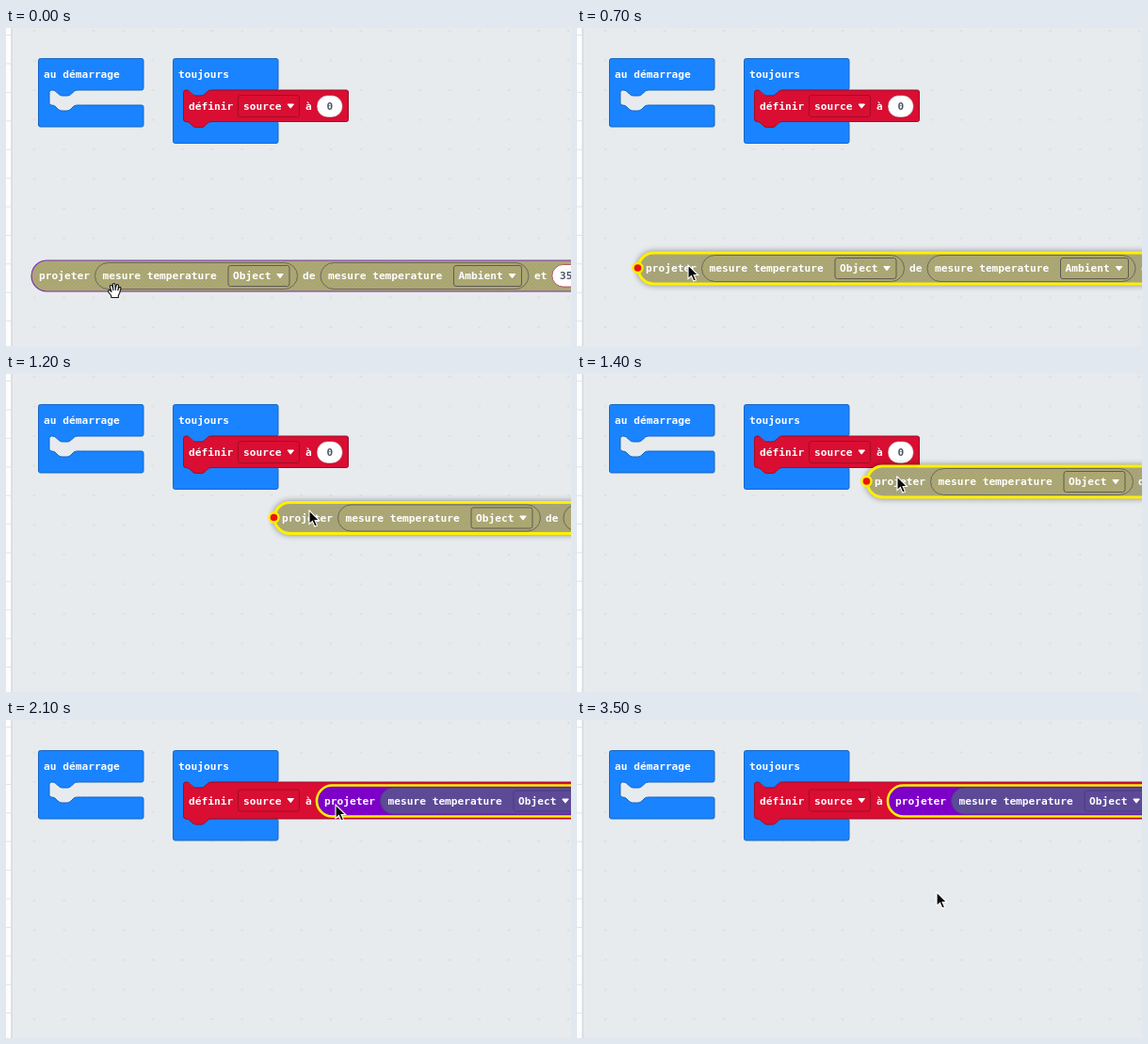
Animation of 600 by 338 pixels, one loop 3.6 s. Source, as an HTML page:

```html
<!DOCTYPE html>
<html lang="fr">
<head>
<meta charset="utf-8">
<title>Blocs</title>
<style>
  html, body { margin: 0; width: 100%; height: 100%; overflow: hidden; background: #e7ebee; }
  svg { display: block; width: 600px; height: 338px; }
  text { font: bold 11.2px "DejaVu Sans Mono", "Noto Sans Mono", monospace; fill: #fff; white-space: pre; }
  text.num { fill: #4f566b; }
  .event { fill: #1a83ff; stroke: #1767c4; }
  .set { fill: #d90e32; stroke: #a00d28; }
  .box { fill: none; stroke: #a50c26; }
  .tri { fill: #fff; stroke: #fff; stroke-width: 1; stroke-linejoin: round; }
  .input { fill: #fff; stroke: #a00d28; stroke-width: .6; }
  .glow { fill: none; stroke: #fdf000; stroke-width: 3; }
  .dot { fill: #ee1313; stroke: #fdee00; stroke-width: 2.4; }
  .link { stroke: #fdee00; stroke-width: 3; }

  .body { fill: url(#hatch); stroke: #7c2fae; stroke-width: 1.2; }
  .pill { fill: url(#hatch); stroke: #69675a; }
  .menu { fill: none; stroke: #5d5b52; }
  .picked .body { stroke: #fdf000; stroke-width: 3; }
  .dragged { filter: drop-shadow(0 0 3px rgba(0, 0, 0, .45)); }
  .dragged .body { fill-opacity: .85; }
  .joined .body { fill: #7d00c8; stroke-width: 2.6; }
  .joined .pill { fill: #5c4a97; stroke: #4d3c86; }
  .joined .menu { stroke: #4b3b82; }
</style>
</head>
<body>
<svg viewBox="0 0 600 338">
  <defs>
    <pattern id="hatch" width="4" height="4" patternUnits="userSpaceOnUse">
      <path d="M0 0h4v4h-4z" fill="#a6a37f"/>
      <path d="M0 0L4 4M4 0L0 4" stroke="#b3ac62" stroke-width=".8"/>
    </pattern>
    <pattern id="grid" x="30" y="2" width="31.5" height="31.5" patternUnits="userSpaceOnUse">
      <path d="M30 1h3M0 1h1.5M.5 0v2" stroke="#d9dde0" stroke-width="1"/>
    </pattern>
    <pattern id="ticks" y="37.5" width="5" height="30.4" patternUnits="userSpaceOnUse">
      <path d="M0 .5h5" stroke="#dfe2e4"/>
    </pattern>
  </defs>
  <path d="M0 0H600V338H0z" fill="#e7ebee"/>
  <path d="M0 0H600V338H0z" fill="url(#grid)"/>
  <path d="M0 0H5.5V338H0z" fill="#fdfdfd"/>
  <path d="M0 0H5V338H0z" fill="url(#ticks)"/>
  <path d="M6 0V338" stroke="#cdd1d4"/>
  <path id="start" class="event"/>
  <path id="forever" class="event"/>
  <text x="40" y="53">au démarrage</text>
  <text x="183" y="53">toujours</text>
  <path id="set" class="set"/>
  <g id="setLabel">
    <text x="194" y="87">définir</text>
    <rect class="box" x="246.500" y="71.500" width="65" height="23" rx="2.500"/>
    <text x="252" y="87">source</text>
    <path class="tri" d="M299 81h6.500l-3.250 4.200z"/>
    <text x="318" y="87">à</text>
  </g>
  <g id="zero">
    <rect class="input" x="330" y="71.500" width="27.500" height="23.500" rx="11.750"/>
    <text class="num" x="340.400" y="87">0</text>
  </g>
  <g id="hint">
    <rect class="glow" x="330" y="70.500" width="28" height="25" rx="12.500"/>
    <circle class="dot" cx="329" cy="83" r="5"/>
  </g>
  <g id="map"></g>
  <path id="link" class="link"/>
  <circle id="dot" class="dot" r="5"/>
  <path id="arrow" d="M0 0V14.600L3.400 11.500L5.800 17L8.400 15.900L6.100 10.500H10.600z"
        fill="#0a0a0a" stroke="#fff" stroke-width="1.100"/>
  <g id="hand" stroke="#151515" stroke-width="1.100" stroke-linejoin="round" fill="#fff">
    <path d="M-3 8.500L-3.600 6L-6.300 2.600Q-7 .6-5 .5L-3 2.300L-4.600-3.200Q-4.600-5.200-2.700-4.600L-1.200-1L-1.600-5.600
             Q-.4-7.300 .8-5.600L1.200-1L2.400-5.200Q3.900-6.200 4.500-4.500L4 0L5.200-2.400Q6.800-3.200 7-1.500L5.600 4L4.300 6.200V8.500z"/>
    <path d="M-1.200-1V1M1.200-1V1M4 0L3.700 1.200" fill="none"/>
  </g>
</svg>
<script>
const LOOP = 3600, STEP = 100, PICK = 400, LIFT = 700, NEAR = 1500, JOIN = 1900;

// time, x, y
const pointer = [[0, 115, 278], [100, 102, 275], [300, 72, 265], [400, 69, 264], [600, 69, 264],
  [700, 118, 252], [800, 190, 232], [900, 247, 210], [1000, 281, 187], [1200, 322, 145],
  [1400, 340, 109], [1600, 346, 95], [1900, 347, 93], [2100, 350, 90], [2400, 350, 91],
  [2700, 364, 130], [3000, 379, 172], [3200, 382, 183], [3600, 382, 183]];
const offset = [[0, 0, 0], [600, 0, 0], [700, 38, -8], [800, 98, -23], [900, 161, -40],
  [1000, 206, -63], [1200, 258, -110.5], [1400, 281, -149], [1600, 287, -167],
  [1899, 288, -168], [1900, 303, -177.5], [3600, 303, -177.5]];

const $ = id => document.getElementById(id);
const attr = (id, name, value) => $(id).setAttribute(name, value);
const show = (id, on) => attr(id, "visibility", on ? "visible" : "hidden");
const move = (id, x, y) => attr(id, "transform", `translate(${x} ${y})`);

const notchLeft = "h-4q-3 0-4.500 2l-2 2q-2 2-4 2h-6q-2 0-4-2l-2-2q-1.500-2-4.500-2";
const notchRight = "q3 0 4.500 2l2 2q2 2 4 2h6q2 0 4-2l2-2q1.500-2 4.500-2h4";

function hat(x, slotBottom) {
  const r = x + 112, end = slotBottom + 23;
  return `M${x + 2.5} 32.500H${r - 2}q2 0 2 2V64q0 2-2 2H${x + 46}${notchLeft}H${x + 14.5}q-2.500 0-2.500 2.500` +
    `V${slotBottom - 2.5}q0 2.500 2.500 2.500${notchRight}H${r - 2}q2 0 2 2V${end - 2}q0 2-2 2H${x + 2.5}` +
    `q-2 0-2-2V34.500q0-2 2-2z`;
}

function statement(right, bottom) {
  return `M191 66${notchRight}H${right - 2}q2 0 2 2V${bottom - 2}q0 2-2 2H222${notchLeft}H191` +
    `q-2.500 0-2.500-2.500V68.500q0-2.500 2.500-2.500z`;
}

const label = (x, s, cls = "") => `<text class="${cls}" x="${x}" y="267">${s}</text>`;
const round = (cls, x, y, w, h, r) =>
  `<rect class="${cls}" x="${x}" y="${y}" width="${w}" height="${h}" rx="${r}"/>`;
const reading = (x, w, menuX, menuW, choice) =>
  round("pill", x, 249.5, w, 28, 14) + label(x + 8, "mesure temperature") +
  round("menu", menuX, 252.5, menuW, 22, 2.5) + label(menuX + 5, choice) +
  `<path class="tri" d="M${menuX + menuW - 13.2} 261.500h6.500l-3.250 4.200z"/>`;

$("map").innerHTML = round("body", 27, 247, 700, 33, 16.5) + label(35, "projeter") +
  reading(94.5, 215, 236, 65, "Object") + label(315, "de") +
  reading(334, 221, 475.5, 72, "Ambient") + label(561, "et") +
  round("input", 580, 251.5, 36, 23.5, 11.75) + label(588, "35", "num");
attr("start", "d", hat(34, 82));

function at(track, t) {
  const i = track.findIndex(k => k[0] > t);
  const a = track[i - 1], b = track[i], p = (t - a[0]) / (b[0] - a[0]);
  return [a[1] + (b[1] - a[1]) * p, a[2] + (b[2] - a[2]) * p];
}

function draw(t) {
  const joined = t >= JOIN, dragged = t >= LIFT && !joined, near = t >= NEAR && !joined;
  const [px, py] = at(pointer, t), [dx, dy] = at(offset, t);

  attr("forever", "d", hat(177, joined ? 105 : 99.5));
  attr("set", "d", joined ? statement(1100, 105) : statement(363.5, 99.5));
  move("setLabel", 0, joined ? 2.5 : 0);
  show("zero", !joined);
  show("hint", near);

  attr("map", "class", [t >= PICK && "picked", dragged && "dragged", joined && "joined"]
    .filter(Boolean).join(" "));
  move("map", dx, dy);
  show("dot", dragged);
  move("dot", dx + 26.5, dy + 263);
  show("link", near);
  attr("link", "d", `M${dx + 30} ${dy + 259}L325 87`);

  const open = t < 300;
  show("hand", open);
  show("arrow", !open);
  move("hand", px, py);
  move("arrow", px, py);
}

const begin = performance.now();
function tick() {
  const t = (performance.now() - begin) % LOOP;
  draw(Math.floor(t / STEP) * STEP);
  requestAnimationFrame(tick);
}
tick();
</script>
</body>
</html>
```
